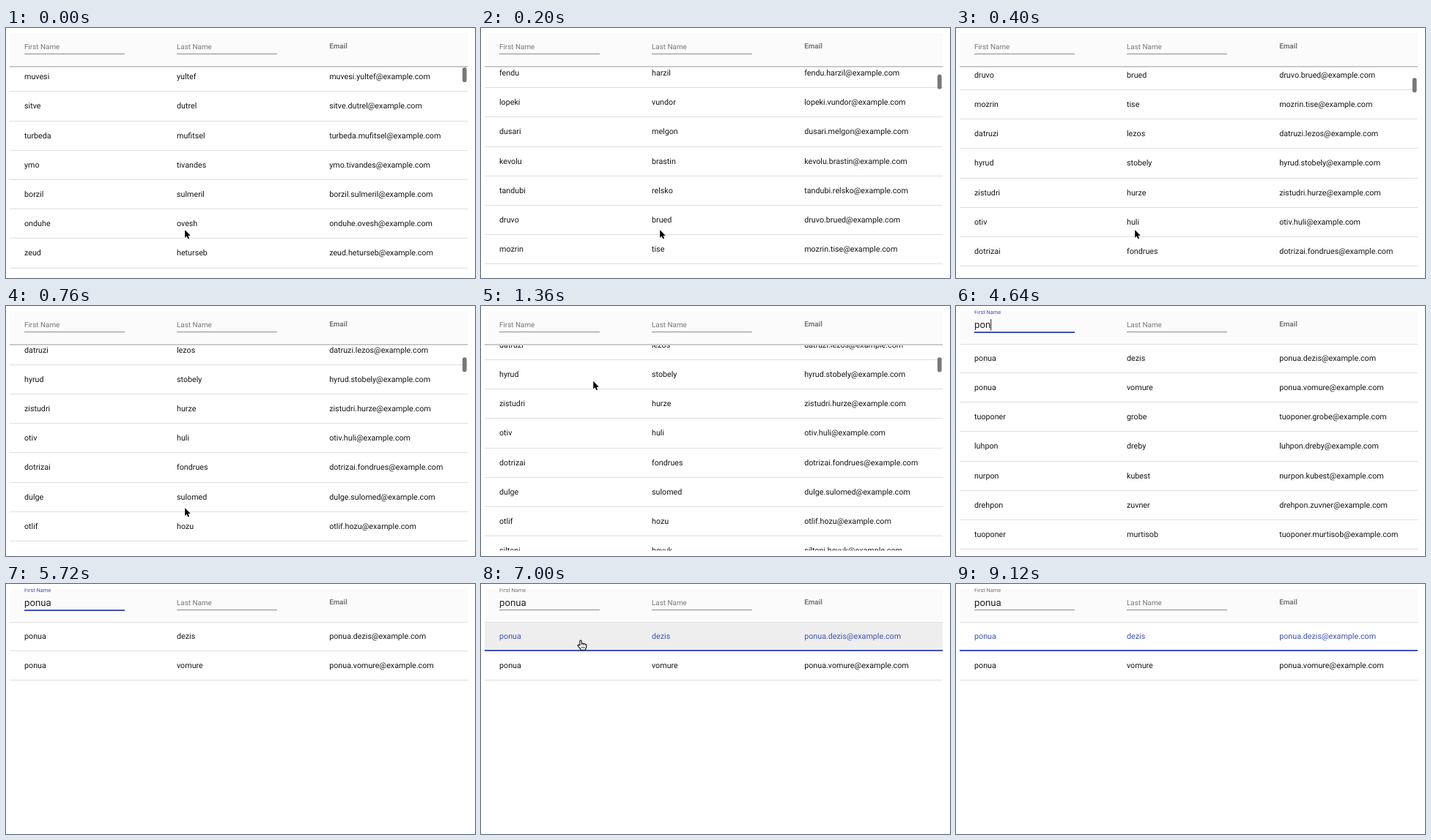
An HTML page for the animation above (9.16 s loop, 640 by 342 pixels).

```html
<!DOCTYPE html>
<html lang="en">
<head>
<meta charset="utf-8">
<title>Filterable table</title>
<style>
  html, body { margin: 0; width: 100%; height: 100%; overflow: hidden; background: #fff; }
  svg { display: block; width: 640px; height: 342px; }
  text { font-family: Roboto, sans-serif; text-rendering: geometricPrecision; white-space: pre; }
  .cell { font-size: 10.73px; }
  .hint { font-size: 9.9px; fill: #777; }
  .crisp { shape-rendering: crispEdges; }
</style>
</head>
<body>
<svg id="stage" viewBox="0 0 640 342">
  <defs>
    <clipPath id="body"><rect x="5" y="52" width="625" height="282.5"/></clipPath>
    <clipPath id="top"><rect x="5" y="6" width="625" height="48"/></clipPath>
  </defs>
  <g id="list" clip-path="url(#body)"></g>
  <rect id="thumb" x="622.9" width="5.7" height="20" rx="2.85" fill="#777"/>
  <g clip-path="url(#top)">
    <rect class="crisp" x="5" y="7" width="625" height="45" fill="#fbfbfb"/>
    <rect class="crisp" x="5" y="52" width="625" height="1" fill="#e0e0e0"/>
    <g id="shadow" class="crisp">
      <rect x="5" y="52" width="625" height="1" fill="#c0c0c0"/>
      <rect x="5" y="53" width="625" height="1" fill="#d6d6d6"/>
    </g>
    <rect class="crisp" x="25" y="35" width="137" height="1" fill="#8c8c8c"/>
    <rect class="crisp" x="233" y="35" width="137" height="1" fill="#8c8c8c"/>
    <rect id="ink" y="35" height="2" fill="#3f51b5"/>
    <text id="label" class="hint" x="25">First Name</text>
    <text class="hint" x="233" y="29.2">Last Name</text>
    <text class="hint" x="441.2" y="27.7" font-weight="700">Email</text>
    <text id="typed" x="25" y="30" font-size="13.2" fill="#212121"></text>
    <rect id="caret" y="18" width="1" height="15.5" fill="#222"/>
  </g>
  <g id="arrow"><path d="M.2 1.2V11.9L2.7 9.7 4.3 13.5 6.1 12.7 4.5 9.1H7.8Z" fill="#000" stroke="#fff" stroke-width="1.4" paint-order="stroke"/></g>
  <g id="beam" fill="none">
    <path id="bar" d="M-3.4 -6Q-.6 -6 0 -4.6Q.6 -6 3.4 -6M0 -4.6V4.8M-3.4 6.2Q-.6 6.2 0 4.8Q.6 6.2 3.4 6.2M-1.6 2.6H1.6" stroke="#fff" stroke-width="2.6"/>
    <path d="M-3.4 -6Q-.6 -6 0 -4.6Q.6 -6 3.4 -6M0 -4.6V4.8M-3.4 6.2Q-.6 6.2 0 4.8Q.6 6.2 3.4 6.2M-1.6 2.6H1.6" stroke="#111" stroke-width="1.2"/>
  </g>
  <g id="hand">
    <path d="M-1.2 .8Q0 -.9 1.2 .8V4.4Q2.4 3.4 3.5 4.7Q4.9 4 5.8 5.3Q7.6 4.9 7.8 6.8V9Q7.6 10.8 6.6 11.8V13.2H-.2V11.9L-3.9 7.6Q-4.2 6 -2.6 6L-1.2 7.2Z" fill="#fff" stroke="#111" stroke-width="1.1" stroke-linejoin="round"/>
    <path d="M1.2 4.6V6.8M3.5 5V7M5.8 5.5V7.2M1.3 8.8V11M3.2 8.8V11M5.1 8.8V11" fill="none" stroke="#111" stroke-width=".8"/>
  </g>
</svg>
<script>
const LOOP = 9160, PITCH = 40.2, TOP = 52, BLUE = '#3f51b5', INK = '#161616';

const toPeople = s => s.split(',').map(p => p.trim().split(' '));
const people = toPeople(`muvesi yultef,sitve dutrel,turbeda mufitsel,ymo tivandes,
  borzil sulmeril,onduhe ovesh,zeud heturseb,minzu gorleth,savidu pelkor,terubi olmesk,
  fendu harzil,lopeki vundor,dusari melgon,kevolu brastin,tandubi relsko,druvo brued,
  mozrin tise,datruzi lezos,hyrud stobely,zistudri hurze,otiv huli,dotrizai fondrues,
  dulge sulomed,otlif hozu,siltoni hevuk`);
const later = toPeople(`ponua dezis,ponua vomure,tuoponer grobe,luhpon dreby,
  nurpon kubest,drehpon zuvner,tuoponer murtisob`);

const typing = [[4000, 'p'], [4240, 'po'], [4480, 'pon'], [4800, 'ponu'], [4960, 'ponua']];
const FOCUS = 3160, BLUR = 6480;

// time, x, y of the pointer hot spot
const path = [
  [0, 244, 275], [920, 244, 275], [1600, 117, 33], [2580, 117, 33], [2800, 82, 30.2],
  [2960, 70, 30.2], [5860, 70, 30.2], [6260, 129, 87], [6760, 133, 83], [6960, 136, 77],
  [7060, 136, 77], [7400, 140, 123], [7680, 140, 123], [8040, 96, 162], [8560, -14, 152], [LOOP, -14, 152]
];

const $ = id => document.getElementById(id);
const set = (el, attrs) => { for (const k in attrs) el.setAttribute(k, attrs[k]); };
const show = (el, on) => set(el, { visibility: on ? 'visible' : 'hidden' });
const clamp = v => Math.max(0, Math.min(1, v));
const easeOut = v => 1 - (1 - clamp(v)) ** 3;
const easeInOut = v => v * v * (3 - 2 * v);
const mix = (a, b, v) => a + (b - a) * v;

function make(parent, tag, attrs) {
  const el = document.createElementNS('http://www.w3.org/2000/svg', tag);
  set(el, attrs);
  return parent.appendChild(el);
}

const rows = Array.from({ length: 9 }, () => {
  const g = make($('list'), 'g', {});
  return {
    g,
    bg: make(g, 'rect', { class: 'crisp', x: 5, width: 625, height: 40, fill: '#eee' }),
    line: make(g, 'rect', { class: 'crisp', x: 5, width: 625 }),
    cells: [25, 233, 441.2].map(x => make(g, 'text', { class: 'cell', x }))
  };
});

function search(query) {
  if (!query) return people;
  const fuzzy = new RegExp([...query].join('.*'));
  return [...people, ...later].filter(p => fuzzy.test(p.join(' ')));
}
const results = Object.fromEntries(['', ...typing.map(s => s[1])].map(q => [q, search(q)]));

function pointerAt(t) {
  const i = Math.max(1, path.findIndex(p => p[0] > t));
  const [a, b] = [path[i - 1], path[i]];
  const v = easeInOut(clamp((t - a[0]) / (b[0] - a[0])));
  return [mix(a[1], b[1], v), mix(a[2], b[2], v)];
}

const scrollAt = t => 701.4 - Math.max(0, 700 * Math.exp(-((t / 224.4) ** 1.206)) - 2);

function drawRows(data, scroll, hover, selected) {
  const first = Math.floor(scroll / PITCH);
  rows.forEach((row, n) => {
    const i = first + n, person = data[i];
    show(row.g, !!person);
    show(row.bg, !!person && i === hover);
    if (!person) return;
    const y = TOP + i * PITCH - scroll, on = i === selected;
    const end = Math.round(y + PITCH - .3);
    const [a, b] = person;
    [a, b, `${a}.${b}@example.com`].forEach((s, k) => {
      const cell = row.cells[k];
      if (cell.textContent !== s) cell.textContent = s;
      set(cell, { y: y + 22.7, fill: on ? BLUE : INK });
    });
    set(row.bg, { y: end - 40 });
    set(row.line, { y: on ? end - 2 : end - 1, height: on ? 2 : 1, fill: on ? BLUE : '#dedede' });
  });
}

function drawField(t, query) {
  const focused = t >= FOCUS && t < BLUR;
  const float = easeOut((t - typing[0][0]) / 400);
  const label = $('label');
  label.style.fontSize = mix(9.9, 7.43, float) + 'px';
  label.style.fill = focused ? BLUE : '#777';
  set(label, { y: mix(29.2, 11, float) });

  const grow = easeOut((t - FOCUS) / 300);
  set($('ink'), { x: 93.5 - 68.5 * grow, width: 137 * grow, opacity: 1 - clamp((t - BLUR) / 240) });

  const typed = $('typed');
  if (typed.textContent !== query) typed.textContent = query;
  const since = t < 4000 ? t - FOCUS : Math.max(0, t - 4960);
  show($('caret'), focused && since % 1040 < 520);
  set($('caret'), { x: query ? 25 + typed.getComputedTextLength() : 25 });
}

function drawPointer(t, x, y) {
  const hidden = t >= 4000 && t < 5860;
  const inField = x < 162 && y < 36 && t > 2600;
  const overRow = t > 5860 && y >= TOP && y < TOP + 2 * PITCH && x > 5;
  const kind = hidden ? '' : inField ? 'beam' : overRow ? 'hand' : 'arrow';
  for (const id of ['arrow', 'beam', 'hand']) {
    show($(id), id === kind);
    set($(id), { transform: `translate(${x} ${y})` });
  }
  return overRow ? Math.floor((y - TOP) / PITCH) : -1;
}

function draw(t) {
  const query = typing.reduce((q, [at, s]) => t >= at ? s : q, '');
  const scroll = query ? 0 : scrollAt(t);
  const hover = drawPointer(t, ...pointerAt(t));
  drawRows(results[query], scroll, hover, t >= BLUR ? 0 : -1);
  drawField(t, query);
  show($('shadow'), scroll > 0);
  set($('thumb'), { y: 54 + scroll / 43, opacity: 1 - clamp((t - 1360) / 240) });
}

const start = performance.now();
function tick() {
  draw((performance.now() - start) % LOOP);
  requestAnimationFrame(tick);
}
tick();
</script>
</body>
</html>
```
